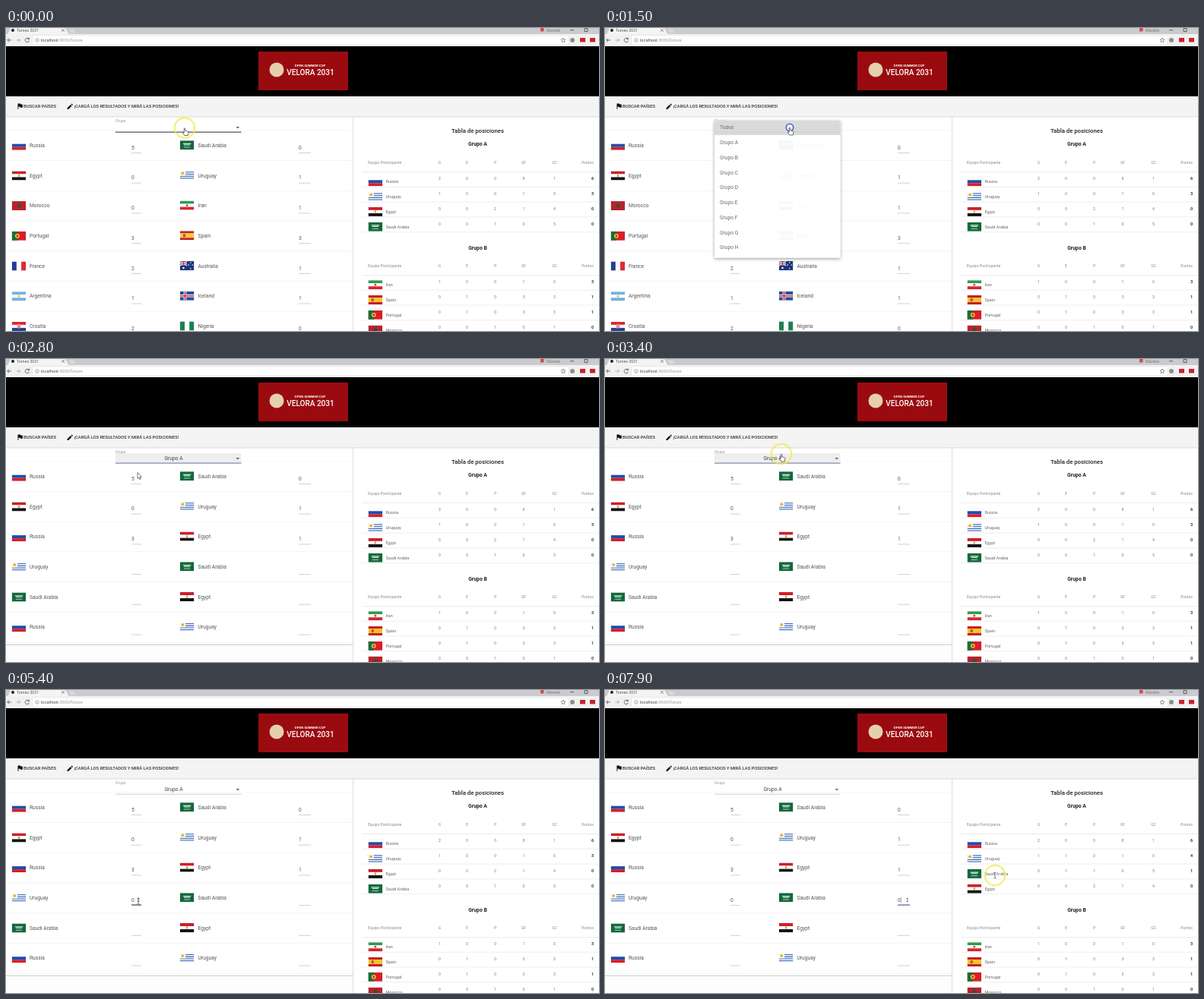
Recreate the animation shown at these times as an HTML page. Size 780 by 399 pixels, loop 8000 ms.

```html
<!DOCTYPE html>
<html lang="es">
<head>
<meta charset="utf-8">
<title>Torneo 2031</title>
<style>
html, body { margin: 0; width: 100%; height: 100%; overflow: hidden; background: #fff; }
svg { display: block; width: 100vw; height: 100vh; font-family: Roboto, "Open Sans", sans-serif; }
text { white-space: pre; }
</style>
</head>
<body>
<svg id="stage" viewBox="0 0 780 399"></svg>
<script>
const stage = document.getElementById('stage');
const LOOP = 8000, ROW = 39.7, LINE = 19.8;

const rect = (x, y, w, h, fill, more = '') =>
  `<rect x="${x}" y="${y}" width="${w}" height="${h}" fill="${fill}" ${more}/>`;
const path = (d, fill, more = '') => `<path d="${d}" fill="${fill}" ${more}/>`;
const stroke = (d, color, w = 0.8) => path(d, 'none', `stroke="${color}" stroke-width="${w}"`);
const dot = (x, y, r, fill) => `<circle cx="${x}" cy="${y}" r="${r}" fill="${fill}"/>`;
const text = (x, y, s, size = 6.7, fill = '#555', weight = 400, anchor = 'start') =>
  `<text x="${x}" y="${y}" font-size="${size}" fill="${fill}" font-weight="${weight}" text-anchor="${anchor}">${s}</text>`;
const group = (id, body) => `<g id="${id}">${body}</g>`;

// Flags on an 18 x 12 field
const rows = (...c) => c.map((f, i) => rect(0, i * 12 / c.length, 18, 12 / c.length, f)).join('');
const cols = (...c) => c.map((f, i) => rect(i * 18 / c.length, 0, 18 / c.length, 12, f)).join('');
const crossed = (bg, x, bands) => rect(0, 0, 18, 12, bg) +
  bands.map(([c, w]) => stroke(`M${x} 0V12M0 6H18`, c, w)).join('');
const flags = {
  'Russia': rows('#fff', '#1c4fae', '#d5202c'),
  'Saudi Arabia': rect(0, 0, 18, 12, '#12693c') +
    stroke('M4 4.2h10M5 5.8h8', '#dcece1', 1.1) + stroke('M5 8.8h8', '#e7f2ea', .7),
  'Egypt': rows('#cf1d2c', '#fff', '#151515') + rect(8, 4.5, 2, 3, '#c9a13c'),
  'Uruguay': rows('#fff', '#3568b8', '#fff', '#3568b8', '#fff', '#3568b8', '#fff', '#3568b8', '#fff') +
    rect(0, 0, 7, 6.6, '#fff') + dot(3.4, 3.3, 2, '#e8b62c'),
  'Morocco': rect(0, 0, 18, 12, '#b9222d') +
    stroke('M9 3L10.8 8.6L6.1 5.1H11.9L7.2 8.6Z', '#1b5a32', .8),
  'Iran': rows('#2c9d4e', '#fff', '#d32a31') + dot(9, 6, 1.4, '#d64045'),
  'Portugal': rect(0, 0, 18, 12, '#d81f2a') + rect(0, 0, 7, 12, '#16703a') +
    dot(7, 6, 2.8, '#f0d23a') + rect(5.8, 4.6, 2.4, 2.8, '#d81f2a'),
  'Spain': rows('#c81e28', '#f5c52c', '#f5c52c', '#c81e28') + rect(4, 4, 3, 4, '#b0583a'),
  'France': cols('#233f92', '#fff', '#dd2a36'),
  'Australia': rect(0, 0, 18, 12, '#1c3580') + stroke('M0 0L9 6M9 0L0 6', '#fff', 1) +
    stroke('M4.5 0V6M0 3H9', '#fff', 1.8) + stroke('M4.5 0V6M0 3H9', '#d32737', 1) +
    dot(4.5, 9, 1.2, '#fff') + [[13.5, 2], [16, 5], [11, 5], [13.5, 10]].map(p => dot(...p, .8, '#fff')).join(''),
  'Argentina': rows('#74b3e2', '#fff', '#74b3e2') + dot(9, 6, 1.4, '#e9b944'),
  'Iceland': crossed('#20519f', 6.5, [['#fff', 3.4], ['#d5283a', 1.6]]),
  'Croatia': rows('#dd2530', '#fff', '#22418f') + rect(6.8, 3, 4.4, 5.5, '#e2545a') +
    stroke('M8 3V8.5M10 3V8.5', '#fff', .7),
  'Nigeria': cols('#1c8150', '#fff', '#1c8150')
};
const flagId = name => 'flag-' + name.replace(' ', '');
const defs = '<defs>' + Object.entries(flags).map(([name, art]) =>
  `<symbol id="${flagId(name)}" viewBox="0 0 18 12" preserveAspectRatio="none">${art}` +
  rect(.2, .2, 17.6, 11.6, 'none', 'stroke="#000" stroke-opacity=".08" stroke-width=".4"') + '</symbol>').join('') +
  '<filter id="shadow" x="-10%" y="-10%" width="120%" height="125%">' +
  '<feDropShadow dx="0" dy="1.5" stdDeviation="2" flood-opacity=".4"/></filter></defs>';
const flag = (name, x, y) =>
  `<use href="#${flagId(name)}" x="${x}" y="${y}" width="18.6" height="12"/>`;

function browser() {
  return rect(0, 0, 780, 9, '#c9cbce') + path('M2 9L6 0H78L83 9Z', '#f4f4f4') +
    path('M83 1.5h6l2.5 5h-6z', '#d9dadc') +
    dot(9, 3, 2, '#222') + text(14, 5, 'Torneo 2031', 5.2, '#555') +
    stroke('M73 1l4 4M77 1l-4 4', '#666', .7) +
    rect(703, 0, 4.5, 4.5, '#d8484a') + text(711, 4.6, 'Mariela', 5.4, '#777') +
    stroke('M742 2.8h5', '#444') + stroke('M761 .6h4v4h-4z', '#444') +
    rect(0, 8, 780, 16, '#f1f1f1') + rect(35, 10, 705, 12, '#fff', 'rx="1.5" stroke="#dedede" stroke-width=".5"') +
    stroke('M7 16H2M4 13.7L1.7 16L4 18.3', '#555', .9) +
    stroke('M13.5 16H18.5M16.5 13.7L18.8 16L16.5 18.3', '#aaa', .9) +
    stroke('M30 14.3a2.7 2.7 0 1 0 .5 2.5M30.4 12.8v2h-2', '#555', .9) +
    `<circle cx="41" cy="16" r="2.3" fill="none" stroke="#777" stroke-width=".6"/>` + stroke('M41 15.5v2', '#777', .6) +
    `<text x="46" y="18" font-size="5.6" fill="#444">localhost<tspan fill="#999">:3000/fixture</tspan></text>` +
    path('M733 13l.9 2 2.2.2-1.7 1.4.5 2.2-1.9-1.2-1.9 1.2.5-2.2-1.7-1.4 2.2-.2z', 'none', 'stroke="#555" stroke-width=".6"') +
    dot(745, 16, 3, '#8b8e91') + rect(755, 13, 7, 5.5, '#c9232b') + rect(768, 13, 7, 5.5, '#c9232b');
}

function header() {
  return rect(0, 24, 780, 66, '#000') + rect(332, 31, 118, 51, '#9a0b10') +
    dot(356, 55, 9.5, '#e6cfae') +
    text(400, 51.4, 'OPEN SUMMER CUP', 4.4, '#fff', 700, 'middle') +
    text(400.5, 61.5, 'VELORA 2031', 10, '#fff', 500, 'middle') +
    rect(0, 90, 780, 27, '#f4f4f4') + rect(0, 116.5, 780, 1, '#dcdcdc') +
    path('M15.5 99.5h3.4l.4 1h2.5v4.2h-2.8l-.4-1h-2.2v3.3h-.9z', '#111') +
    text(23, 105.2, 'BUSCAR PAÍSES', 5.85, '#333', 500) +
    path('M80.5 105.5v1.6h1.6l4.4-4.4-1.6-1.6zM85.5 100.5l1-1 1.6 1.6-1 1z', '#111') +
    text(89.5, 105.2, '¡CARGÁ LOS RESULTADOS Y MIRÁ LAS POSICIONES!', 5.8, '#333', 500);
}

function match([home, a, away, b], i) {
  const y = 154.5 + i * ROW, rule = y + 10;
  return flag(home, 7.7, y - 5.8) + text(31, y + 2.4, home) + text(165, y + 5.2, a) +
    flag(away, 228.8, y - 6.3) + text(252.5, y + 2.4, away) + text(385, y + 5.2, b) +
    stroke(`M165 ${rule}h13M385 ${rule}h16`, '#c6c6c6', .8) +
    stroke(`M0 ${y + 20}H456`, '#f2f2f2', .8);
}
const allMatches = [
  ['Russia', 5, 'Saudi Arabia', 0], ['Egypt', 0, 'Uruguay', 1], ['Morocco', 0, 'Iran', 1],
  ['Portugal', 3, 'Spain', 3], ['France', 2, 'Australia', 1], ['Argentina', 1, 'Iceland', 1],
  ['Croatia', 2, 'Nigeria', 0]
];
const groupMatches = [
  ['Russia', 5, 'Saudi Arabia', 0], ['Egypt', 0, 'Uruguay', 1], ['Russia', 3, 'Egypt', 1],
  ['Uruguay', '', 'Saudi Arabia', ''], ['Saudi Arabia', '', 'Egypt', ''], ['Russia', '', 'Uruguay', '']
];

const columns = [570.5, 606.5, 643.5, 681, 721.5];
function standings(teams, top) {
  return teams.map(([name, ...n], i) => {
    const y = top + i * LINE, points = n.pop();
    return flag(name, 476.5, y - 6) + text(499.5, y + 2, name, 5.5, '#666') +
      n.map((v, k) => text(columns[k], y - 2, v, 5, '#777', 400, 'middle')).join('') +
      text(771.5, y - 2, points, 5.4, '#333', 700, 'middle') +
      stroke(`M468 ${y + 7}H780`, '#e9e9e9', .7);
  }).join('');
}
function tableHead(name, y) {
  return text(620.5, y + 2.3, name, 6.8, '#222', 700, 'middle') +
    text(476, y + 25.8, 'Equipo Participante', 5.1, '#8a8a8a') +
    ['G', 'E', 'P', 'GF', 'GC'].map((s, k) => text(columns[k], y + 25.8, s, 5, '#8a8a8a', 400, 'middle')).join('') +
    text(765, y + 25.8, 'Puntos', 5, '#8a8a8a', 400, 'middle') +
    stroke(`M468 ${y + 36.5}H780`, '#e4e4e4', .7);
}
const russia = ['Russia', 2, 0, 0, 8, 1, 6], egypt = ['Egypt', 0, 0, 2, 1, 4, 0];
const before = [russia, ['Uruguay', 1, 0, 0, 1, 0, 3], egypt, ['Saudi Arabia', 0, 0, 1, 0, 5, 0]];
const after = [russia, ['Uruguay', 1, 1, 0, 1, 0, 4], ['Saudi Arabia', 0, 1, 1, 0, 5, 1], egypt];
const groupB = [['Iran', 1, 0, 0, 1, 0, 3], ['Spain', 0, 1, 0, 3, 3, 1],
  ['Portugal', 0, 1, 0, 3, 3, 1], ['Morocco', 0, 0, 1, 0, 1, 0]];

function selectBox() {
  return rect(144, 124, 165.5, 13.5, '#eeeeee', 'id="selectFill"') +
    text(144, 123.6, 'Grupo', 5.1, '#999') +
    group('choice', text(220.5, 133.2, 'Grupo A', 6.7, '#444', 400, 'middle')) +
    path('M302.5 130h4.6l-2.3 2.4z', '#666') +
    '<path id="selectLine" d="M144 137.2H309.5" fill="none"/>';
}
function menu() {
  const items = ['Todos', ...'ABCDEFGH'].map((s, i) => text(151, 133.4 + i * 19.75, i ? 'Grupo ' + s : s, 6.7, '#666'));
  return rect(144, 121.5, 165.5, 181, '#fff', 'filter="url(#shadow)"') +
    rect(144, 121.5, 165.5, 19.5, '#d9d9d9') +
    rect(144, 141, 165.5, 19.75, '#eee', 'id="hoverItem"') + items.join('');
}
const spinner = x => path(`M${x} 275.6l1.7-2.2 1.7 2.2zM${x} 277.4l1.7 2.2 1.7-2.2z`, '#666');
const fields =
  group('typedA', text(165, 278.8, '0')) + group('caretA', stroke('M165.5 272.5v8', '#555', .6)) +
  group('spinA', spinner(172.5)) + group('lineA', stroke('M165 283h13', '#4a5168', 1.2)) +
  group('typedB', text(385, 278.8, '0')) + group('caretB', stroke('M389.4 272.5v8', '#777', .6)) +
  group('spinB', spinner(396)) + group('lineB', stroke('M385 283h16', '#5f6cb8', 1.2));

const pointer =
  '<g id="pointer"><circle id="halo" r="13.2" fill="none" stroke="#efe93c" stroke-opacity=".7" stroke-width="2.2"/>' +
  '<circle id="press" fill="#fff" fill-opacity=".6" stroke="#4a66cc" stroke-width="1.6"/>' +
  group('hand', path('M-.8 .8Q0-.4 .8 .8V4Q1.8 3.4 2.2 4.4Q3.2 3.9 3.6 4.9Q5 4.6 5 6L4.3 10H-.2L-2.6 6.6Q-2.6 5.2-.8 6.4Z',
    '#fff', 'stroke="#333" stroke-width=".7"')) +
  group('arrow', path('M0 0V8L1.8 6.4L3 9.2L4.2 8.7L3 6H5.3Z', '#fff', 'stroke="#444" stroke-width=".7"')) +
  group('ibeam', stroke('M-1.5-3.8H1.5M0-3.8V3.8M-1.5 3.8H1.5', '#555', .7)) + '</g>';

stage.innerHTML = defs + rect(0, 0, 780, 399, '#fff') +
  stroke('M0 134.8H456', '#f4f4f4') +
  group('listAll', allMatches.map(match).join('')) +
  group('listGroup', groupMatches.map(match).join('') + rect(0, 376, 456, 23, '#fdfdfd') + rect(0, 375.6, 456, 1.2, '#cfcfcf')) +
  fields + selectBox() +
  rect(456, 117, 324, 282, '#fff') + rect(456, 117, 1, 282, '#dedede') +
  text(620.5, 138.2, 'Tabla de posiciones', 7.75, '#222', 500, 'middle') +
  tableHead('Grupo A', 153) + group('tableOld', standings(before, 202.3)) + group('tableNew', standings(after, 202.3)) +
  tableHead('Grupo B', 289.3) + standings(groupB, 338.2) +
  browser() + header() + group('menu', menu()) + pointer;

const el = {};
stage.querySelectorAll('g[id], path[id], rect[id], circle[id]').forEach(n => el[n.id] = n);
const show = (id, on) => el[id].setAttribute('visibility', on ? 'visible' : 'hidden');
const within = (t, a, b) => t >= a && t < b;
const ramp = (t, a, b) => Math.min(1, Math.max(0, (t - a) / (b - a)));
const smooth = u => u * u * (3 - 2 * u);

const route = [[0, 235, 131.5], [300, 235, 131.5], [800, 243, 131], [1600, 243, 131], [2000, 173, 149.5],
  [2900, 173, 149.5], [3350, 232, 125], [3550, 232, 125], [4250, 174.5, 281], [4700, 174.5, 281],
  [5000, 174, 278], [7350, 174, 278], [7850, 513, 244], [LOOP, 513, 244]];
function pointerAt(t) {
  const i = route.findIndex(p => p[0] > t);
  const [t0, x0, y0] = route[i - 1], [t1, x1, y1] = route[i];
  const u = smooth(ramp(t, t0, t1));
  return [x0 + (x1 - x0) * u, y0 + (y1 - y0) * u];
}

const FOCUS_A = 4400, TYPE_A = 5300, TAB = 5900, TYPE_B = 6430, PICK = 2350;
const blink = (t, from) => (t - from) % 1000 < 500;

function draw(t) {
  const picked = t >= PICK, [x, y] = pointerAt(t);
  show('listAll', !picked);
  show('listGroup', picked);
  show('choice', picked);

  const focused = within(t, PICK, FOCUS_A), hover = t < PICK;
  show('selectFill', focused);
  el.selectLine.setAttribute('stroke', focused ? '#7f92b3' : hover ? '#555' : '#c2c2c2');
  el.selectLine.setAttribute('stroke-width', focused || hover ? 1.3 : .8);

  const open = ramp(t, 1320, 1510) * (1 - ramp(t, 2250, 2450));
  show('menu', open > 0);
  el.menu.setAttribute('opacity', open);
  const scale = t < 1600 ? .6 + .4 * ramp(t, 1320, 1450) : 1;
  el.menu.setAttribute('transform', `translate(0 ${121.5 * (1 - scale)}) scale(1 ${scale})`);
  el.hoverItem.setAttribute('opacity', t > 1850 ? 1 : 0);

  const overA = within(t, 4200, 7420);
  show('typedA', t >= TYPE_A);
  show('caretA', within(t, FOCUS_A, TYPE_A) && blink(t, FOCUS_A));
  show('spinA', overA);
  show('lineA', overA);
  show('typedB', t >= TYPE_B);
  show('caretB', t >= TAB && blink(t, t < TYPE_B ? TAB : TYPE_B));
  el.caretB.setAttribute('transform', `translate(${t < TYPE_B ? -4 : 0} 0)`);
  show('spinB', t >= TAB);
  show('lineB', t >= TAB);
  show('tableOld', t < TYPE_B + 30);
  show('tableNew', t >= TYPE_B + 30);

  el.pointer.setAttribute('transform', `translate(${x} ${y})`);
  const click = [1300, 2150, 4380].find(c => within(t, c, c + 280));
  show('press', click !== undefined);
  if (click !== undefined) el.press.setAttribute('r', 6.5 - 2.5 * ramp(t, click, click + 280));
  show('halo', t < 1300 || within(t, 1600, 2150) || within(t, 2930, 4380) || t >= 7350);
  const hand = t < PICK || within(t, 3150, 3650);
  const beam = within(t, 4150, 7450) || t >= 7750;
  show('hand', hand);
  show('ibeam', beam);
  show('arrow', !hand && !beam);
}

const start = performance.now();
function tick(now) {
  draw(Math.max(0, now - start) % LOOP);
  requestAnimationFrame(tick);
}
draw(0);
requestAnimationFrame(tick);
</script>
</body>
</html>
```
